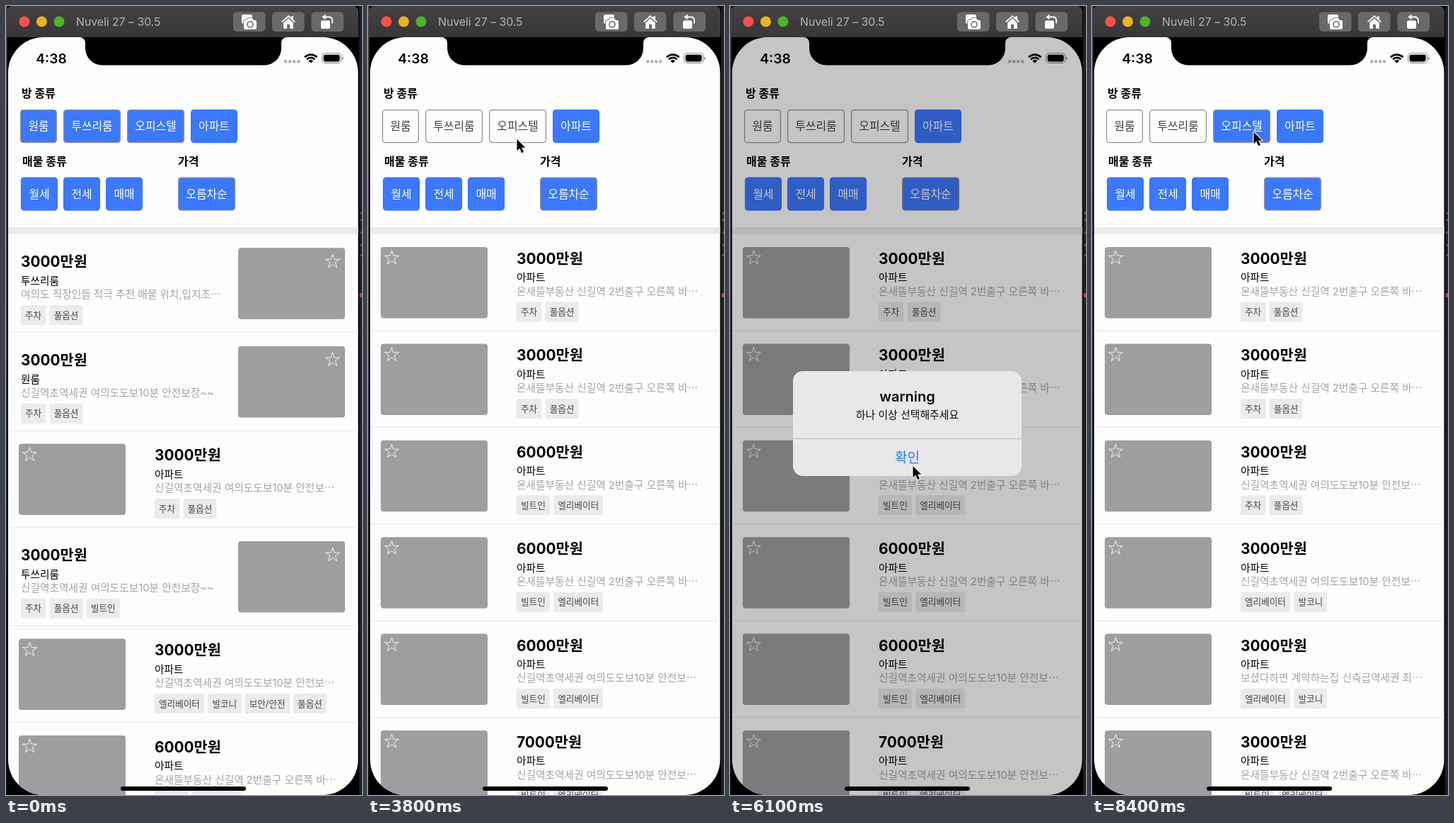
Recreate the animation shown at these times as an HTML page with a canvas. Size 503 px wide and 1113 px high, loop 8500 ms.

```html
<!DOCTYPE html>
<html lang="ko">
<head>
<meta charset="utf-8">
<style>
html, body { margin: 0; width: 100%; height: 100%; overflow: hidden; background: #000; }
canvas { display: block; width: 100vw; height: 100vh; }
</style>
</head>
<body>
<canvas id="stage" width="503" height="1113"></canvas>
<script>
const ctx = document.getElementById('stage').getContext('2d');
const LOOP = 8500, STEP = 100;
const WHITE = '#fefdfe', BLUE = '#3c78fb', BORDER = '#929196';

const DESC = [
  '여의도 직장인들 적극 추천 매물 위치,입지조⋯',
  '신길역초역세권 여의도도보10분 안전보장~~',
  '신길역초역세권 여의도도보10분 안전보⋯',
  '온새뜰부동산 신길역 2번출구 오른쪽 바⋯',
  '보셨다하면 계약하는집 신축급역세권 최⋯',
  '여의도역 초 역세권 핫 매물 나왔어요 전세대⋯'
];
const BASIC = ['주차', '풀옵션'], BUILT = ['빌트인', '엘리베이터'], LIFT = ['엘리베이터', '발코니'];
const FULL = [...LIFT, '보안/안전', '풀옵션'];
const row = (type, desc, tags, price = 3000) => ({ type, desc: DESC[desc], tags, price });
const apt = (desc, tags, price) => row('아파트', desc, tags, price);
const two = (desc, tags) => row('투쓰리룸', desc, tags);

const ALL = [two(0, BASIC), row('원룸', 1, BASIC), apt(2, BASIC), two(1, [...BASIC, '빌트인']),
  apt(2, FULL), apt(3, BUILT, 6000)];
const NO_STUDIO = [two(0, [...BASIC, '빌트인']), apt(2, BASIC), two(1, BASIC), apt(2, FULL),
  apt(4, LIFT), two(5, BASIC)];
const OFFICE_APT = [apt(3, BASIC), apt(3, BASIC), apt(2, BASIC), apt(2, LIFT), apt(4, LIFT), apt(3, BUILT)];
const APT = [apt(3, BASIC), apt(3, BASIC), apt(3, BUILT, 6000), apt(3, BUILT, 6000),
  apt(2, BUILT, 6000), apt(2, BUILT, 7000)];

// start time, selected room types, list
const STATES = [
  [0, '원룸 투쓰리룸 오피스텔 아파트', ALL],
  [1000, '투쓰리룸 오피스텔 아파트', NO_STUDIO],
  [2300, '오피스텔 아파트', OFFICE_APT],
  [3400, '아파트', APT],
  [7200, '오피스텔 아파트', OFFICE_APT]
];

// time, x, y of the pointer tip
const PATH = [
  [300, 95, -25], [1000, 50.5, 174], [1500, 50.5, 174], [2100, 120, 176], [2700, 120, 176],
  [3200, 211, 175], [3500, 211, 177], [3800, 210.5, 188], [4200, 210.5, 188], [4900, 308.5, 168],
  [5300, 308.5, 168], [6000, 258.5, 649], [6300, 258.5, 649], [6900, 211.5, 162], [7300, 211.5, 162],
  [8400, 228.5, 178]
];
const ALERT_IN = 5050, ALERT_OUT = 6250, ALERT_TIME = 400;

const clamp = v => Math.max(0, Math.min(1, v));
const easeOut = v => 1 - (1 - clamp(v)) ** 3;

function box(x, y, w, h, r, fill, stroke, lw = 1) {
  ctx.beginPath();
  ctx.roundRect(x, y, w, h, r);
  paint(fill, stroke, lw);
}

function paint(fill, stroke, lw) {
  if (fill) { ctx.fillStyle = fill; ctx.fill(); }
  if (stroke) { ctx.strokeStyle = stroke; ctx.lineWidth = lw; ctx.stroke(); }
}

function disc(x, y, r, fill) {
  ctx.beginPath();
  ctx.arc(x, y, r, 0, 7);
  paint(fill);
}

function shape(d, x, y, fill, stroke, lw) {
  ctx.save();
  ctx.translate(x, y);
  const p = new Path2D(d);
  if (stroke) { ctx.strokeStyle = stroke; ctx.lineWidth = lw; ctx.lineJoin = 'round'; ctx.stroke(p); }
  if (fill) { ctx.fillStyle = fill; ctx.fill(p); }
  ctx.restore();
}

function setFont(size, weight = 400) {
  ctx.font = `${weight} ${size}px Inter, "Noto Sans CJK KR", "Noto Sans CJK", sans-serif`;
}

// y is the optical middle of the line
function text(s, x, y, size, color = '#000', weight = 400, align = 'left') {
  setFont(size, weight);
  ctx.textAlign = align;
  ctx.fillStyle = color;
  ctx.fillText(s, x, y + size * 0.37);
}

function star(x, y) {
  ctx.beginPath();
  for (let i = 0; i < 10; i++) {
    const a = i * Math.PI / 5, r = i % 2 ? 4 : 10.5;
    ctx.lineTo(x + r * Math.sin(a), y - r * Math.cos(a));
  }
  ctx.closePath();
  paint(null, '#f4f3f5', 1);
}

function button(label, x, y, w, on, border) {
  box(x + .6, y + .6, w - 1.2, 46, 4, on ? BLUE : WHITE, border ? BORDER : BLUE, 1.3);
  text(label, x + w / 2, y + 23.3, 15.9, on ? '#fff' : '#404043', 400, 'center');
}

function filters(selected) {
  text('방 종류', 22, 123.5, 16, '#000', 700);
  text('매물 종류', 23, 219, 16, '#000', 700);
  text('가격', 243, 219, 16, '#000', 700);
  [['원룸', 20, 52], ['투쓰리룸', 81, 81], ['오피스텔', 171, 81], ['아파트', 261, 66]].forEach(([s, x, w]) =>
    button(s, x, 146, w, selected.split(' ').includes(s), s !== '아파트'));
  ['월세', '전세', '매매'].forEach((s, i) => button(s, 21 + i * 60, 241.5, 52, true, false));
  button('오름차순', 243, 241.5, 81, true, true);
  box(0, 312, 503, 10, 0, '#ebeaed');
}

function listing(item, y) {
  const left = item.type === '아파트';
  const x = left ? 210 : 21, h = left ? 136.4 : 138.7;
  const base = y + (left ? 0 : 4.5);
  box(left ? 18 : 328, y + (left ? 18 : 19.3), 151, 100.5, 4, '#9f9da0');
  star(left ? 33.5 : 461.5, y + (left ? 33.5 : 38.5));
  text(item.price + '만원', x, base + 34.3, 20.8, '#000', 700);
  text(item.type, x, base + 61, 14.7);
  text(item.desc, x, base + 80.3, 14.7, '#a5a3a6');
  let tx = x;
  for (const tag of item.tags) {
    setFont(12.6);
    const w = ctx.measureText(tag).width + 12;
    box(tx, base + 95.5, w, 28, 2, '#ebeaec');
    text(tag, tx + 6, base + 109.5, 12.6, '#48464a');
    tx += w + 5.5;
  }
  box(0, y + h - 1, 503, 1, 0, '#e5e4e7');
  return y + h;
}

function alertBox(p, scale) {
  ctx.save();
  ctx.globalAlpha = p;
  ctx.translate(250.5, 589);
  ctx.scale(scale, scale);
  ctx.translate(-250.5, -589);
  box(89, 515, 323, 148, 14, '#e8e7e9');
  text('warning', 250.5, 550.5, 20, '#0c0c0d', 600, 'center');
  text('하나 이상 선택해주세요', 250.5, 576, 14.9, '#0c0c0d', 400, 'center');
  box(89, 610, 323, 1, 0, '#b9b8bb');
  text('확인', 250.5, 636.5, 19, '#2878f2', 400, 'center');
  ctx.restore();
}

function desktop() {
  box(0, 0, 503, 1113, 0, '#000');
  const edge = ctx.createLinearGradient(0, 0, 0, 1113);
  edge.addColorStop(0, '#5d4a5c');
  edge.addColorStop(.4, '#453a4e');
  edge.addColorStop(.55, '#26304a');
  edge.addColorStop(.75, '#17181e');
  box(0, 0, 1.6, 1113, 0, edge);
  box(499, 0, 4, 1113, 0, '#202024');
  for (const y of [291, 300, 318, 336, 350]) box(501, y, 2, 3, 0, '#8e4152');
  disc(503, 408, 3.5, '#a8485c');
}

function titleBar() {
  const bar = ctx.createLinearGradient(0, 0, 0, 44);
  bar.addColorStop(0, '#434144');
  bar.addColorStop(1, '#383639');
  box(1, 0, 497, 44, [8, 8, 0, 0], bar);
  ['#fb5149', '#e7b423', '#4cb528'].forEach((c, i) => disc(26 + i * 24.5, 22, 7.5, c));
  text('Nuveli 27 – 30.5', 99, 22.5, 15.8, '#b6b4b7');
  for (const x of [321, 376, 431.5]) box(x, 8.5, 45.5, 27.5, 5, '#6a686b');

  // camera
  box(333, 12, 15, 13, 2.5, '#fff');
  shape('M3 4H5L7 1H13L15 4H17Q19 4 19 6V15Q19 17 17 17H3Q1 17 1 15V6Q1 4 3 4Z', 335, 16, '#fff', '#6a686b', 1.6);
  ctx.beginPath();
  ctx.arc(345, 26, 4, 0, 7);
  paint(null, '#6a686b', 1.6);
  // house
  shape('M0 10L10 1L14 4.6V2.5H17V7.3L20 10L18.8 11.3L10 3.6L1.2 11.3Z', 389, 12, '#fff');
  shape('M3.2 11.5L10 5.6L16.8 11.5V20H12V14H8V20H3.2Z', 389, 12, '#fff');
  // rotate
  box(445, 20.5, 13, 11.5, 2, '#fff');
  shape('M0 0H5Q10 0 10 5V9', 451, 15.5, null, '#fff', 1.8);
  shape('M5 0V8L0 4Z', 446.5, 11.5, '#fff');
}

function statusBar() {
  shape('M104 43V44A8 8 0 0 1 112 52V59.5A24 24 0 0 0 136 83.5H365A24 24 0 0 0 389 59.5V52A8 8 0 0 1 397 44V43Z',
    0, 0, '#000');
  text('4:38', 64, 74, 19.3, '#000', 600, 'center');
  for (let i = 0; i < 4; i++) box(393 + i * 6, 76, 4.4, 4.4, 1.6, '#b4b3b6');
  for (const [r, w] of [[12, 2.7], [7.7, 2.6], [2.4, 4.6]]) {
    ctx.beginPath();
    ctx.arc(430.7, 80.6, r, -Math.PI * .76, -Math.PI * .24);
    paint(null, '#000', w);
  }
  box(446.6, 66.8, 27, 13.6, 4, null, '#8b8a8d', 1.1);
  box(448.6, 68.8, 23, 9.6, 2.4, '#000');
  box(475, 71.5, 1.8, 4.4, [0, 2, 2, 0], '#8b8a8d');
}

function pointer(t) {
  const i = PATH.findIndex(k => k[0] >= t);
  if (i < 1) return;
  const [t0, x0, y0] = PATH[i - 1], [t1, x1, y1] = PATH[i];
  const u = (t - t0) / (t1 - t0), e = u * u * (3 - 2 * u);
  shape('M0 0V16.3L3.8 12.8L6.6 19.2L9.4 18L6.7 11.8H11.8Z',
    x0 + (x1 - x0) * e, y0 + (y1 - y0) * e, '#000', '#fff', 2.2);
}

function draw(t) {
  const [, selected, items] = STATES.filter(s => s[0] <= t).pop();
  const shown = easeOut((t - ALERT_IN) / ALERT_TIME);
  const gone = easeOut((t - ALERT_OUT) / ALERT_TIME);
  const p = shown * (1 - gone);

  desktop();
  titleBar();
  ctx.save();
  ctx.beginPath();
  ctx.roundRect(3, 44, 494.5, 1069, 50);
  ctx.clip();
  box(0, 44, 503, 1069, 0, WHITE);
  filters(selected);
  items.reduce((y, item) => listing(item, y), 322);
  statusBar();
  if (p > 0) {
    box(0, 44, 503, 1069, 0, `rgba(0,0,0,${.225 * p})`);
    alertBox(p, 1.2 - .2 * shown);
  }
  box(162, 1101, 177, 6, 3, '#000');
  ctx.restore();
  pointer(t);
}

const start = performance.now();
function tick() {
  const t = (performance.now() - start) % LOOP;
  draw(Math.floor(t / STEP) * STEP);
  requestAnimationFrame(tick);
}
tick();
</script>
</body>
</html>
```
